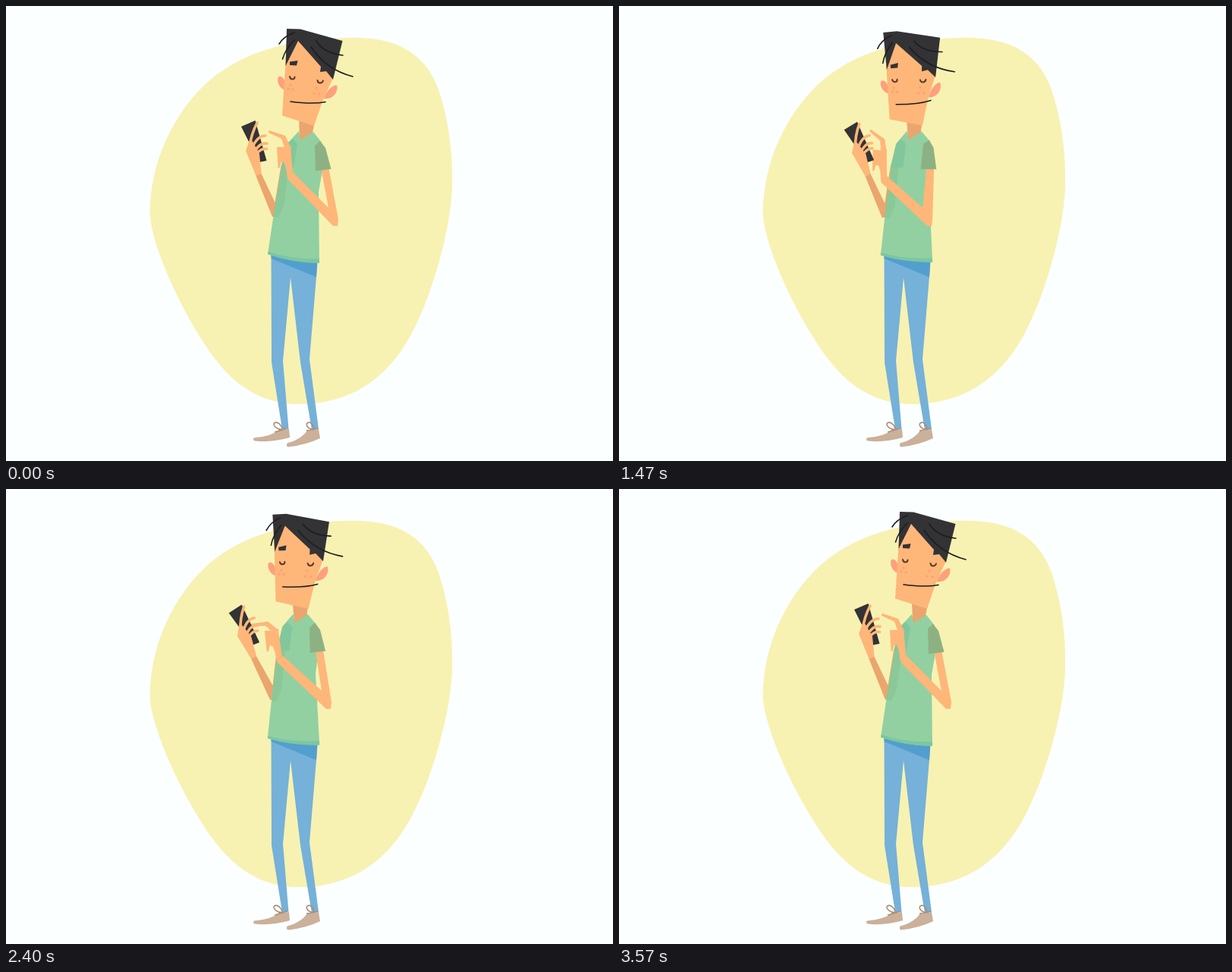
Animation of 800x600 px, one loop 3600 ms. Source, as an HTML page:

```html
<!DOCTYPE html>
<html lang="en">
<head>
<meta charset="utf-8">
<title>Man tapping on a phone</title>
<style>
  html, body { margin: 0; width: 100%; height: 100%; overflow: hidden; background: #fcffff; }
  svg { display: block; width: 800px; height: 600px; }
  .skin { fill: #ffb679; }
  .shade { fill: #eba56e; }
  .dark { fill: #333335; }
  .line { fill: none; stroke: #1d1d1f; stroke-width: 1.6; stroke-linecap: round; }
  .lace { fill: none; stroke: #a98d76; stroke-width: 1.6; }
  .fingers { fill: none; stroke: #ffb679; stroke-width: 3.6; stroke-linecap: round; }
</style>
</head>
<body>
<svg viewBox="0 0 800 600">
  <path fill="#f7f2b2" d="M447 42C505 40 550 55 570 110C585 155 589 200 588 235C588 290 560 390 530 440C495 500 445 525 386 525C325 525 287 487 258 440C223 385 193 315 189.5 275C190 198 226 137 266 100C316 56 385 43 447 42z"/>

  <g id="legs">
    <path fill="#75b1d8" d="M349.500 329L410 338 409 357 400 466 412 558 403 559 388 470 375 358 365 468 372.500 558 364 558 350 470z"/>
    <path fill="#529fcf" d="M349.500 328L410.500 337 409 357.500 349.500 333z"/>
    <g fill="#cbb09a">
      <path d="M326 571Q326 569 330 569Q350 567 360 559L373 558 374 569Q350 576 328 573.500Q326 573 326 571z"/>
      <path d="M370 578Q370 576 374 575.500Q389 571 397 560L412 558 414 570Q395 579 372 581.500Q369.500 581 370 578z"/>
    </g>
    <path class="lace" d="M366 558C358 560 351 553 353.500 550C358 547 363 553 364 557M354 562L370 557M408 558C400 560 394 553 397 550C402 547 405 553 406 557M396 560L411 557"/>
  </g>

  <polygon id="phoneArm" class="shade"/>

  <g id="torso">
    <path class="shade" d="M386 148L407 152 404 167 394 178 387 176z"/>
    <path fill="#92d0a1" d="M386 165L388 176.500 405 166 416 180 417 217 412 245 413 339Q375 338 345 327L352 280 363 222 372 180z"/>
    <path class="shade" d="M387 164L388.500 176.500 404.500 166z"/>
    <path fill="#7cc7a0" d="M345.500 324Q375 334 413 333.500V339Q375 338 345 327.500z"/>
    <path fill="#82c79c" d="M371 181L378 175 384 182 379 213 362 213z"/>
    <path fill="#8bc898" d="M363 213L373 213 371 228 366 264 359 279 352 278z"/>
    <g id="head">
      <path fill="#ffa07c" d="M368 111C357 108 356 92 361 92.500C365 93 367 98 368 101zM418 123C425 106 436 102 436.500 106C437 117 428 124 418 122z"/>
      <path class="skin" d="M369 66L364 144.500 406 158 418 123 431 95 416 58 385 42z"/>
      <path class="dark" d="M368.500 79L370 30 388 30.500 443.500 46 431 97 422 86 414 87 415 80 385 46zM374 73.500L384.500 72 383 78.500 374 78z"/>
      <path class="line" d="M360 50Q366 40 380 35M364.500 70Q368 57 380 45M409 46Q418 62 444 65M402 54Q422 84 457 93M375 126C390 128 408 129 421 126.500"/>
      <path class="line" style="stroke:#5b3c2c;stroke-width:2" d="M374 93q.5 3.500 3.500 3.500t3-3M410.500 98q.5 3.500 3.500 3.500t4-3"/>
      <path stroke="#ff9c74" stroke-width="3" stroke-linecap="round" d="M375 104h0M372 109h0M378 110h0M409 108h0M406 115h0M413 116h0"/>
    </g>
  </g>

  <polygon id="tapArm" class="skin"/>
  <g id="tapHand" class="skin">
    <path d="M357 186L368 186 375 184 378 219 371 228 369 214 366 206 362.500 206 361 213 358.500 214z"/>
    <path id="finger" d="M347 164Q345 166 347 167.500L363 175 368 189 376 188 368 171z"/>
  </g>
  <path id="sleeve" fill="#8db183" d="M407 184L414 178 421 187 428.500 215 408 217.500z"/>

  <g id="phoneHand">
    <path class="dark" d="M310 159L328.500 151 343.500 204 333.500 206z"/>
    <path class="skin" d="M329.500 224L316 191 322 174 327 182 334 195 336.500 221z"/>
    <path class="fingers" d="M321 186Q323 169 331 154M324 188Q331 171 342 171M328 191Q336 179 344 181.500M330 195Q337 187 343.500 188.500"/>
  </g>
</svg>
<script>
const LOOP = 3600;
const HIP = [379, 333], NECK = [397, 150], SHOULDER = [414, 182];
const WRIST = [332, 222], TAP_WRIST = [371, 228], KNUCKLE = [372, 187];
const part = id => document.getElementById(id);

function ease(u) {
  u = Math.max(0, Math.min(1, u));
  return u * u * (3 - 2 * u);
}

// Rises from 0 to 1 at the peak and falls back to 0.
function pulse(t, start, peak, end) {
  return t < peak ? ease((t - start) / (peak - start)) : ease((end - t) / (end - peak));
}

// Every joint is its rest position plus a share of a few overlapping gestures.
function poseAt(t) {
  const relax = pulse(t, 0, 540, 1110);
  const tap = pulse(t, 540, 820, 1110);
  const lift = pulse(t, 540, 1110, 1740);
  const sway = pulse(t, 1110, 1740, 2100);
  const press = pulse(t, 1740, 2100, 2670);
  const bob = pulse(t, 2100, 2380, 2670);
  const read = pulse(t, 2100, 2670, 3570);
  const hold = sway + press + read;
  const busy = relax + lift + press + read;
  return {
    lean: -0.7 * hold - 2.9 * sway - 1.3 * read - 1.2 * bob,
    head: -2.4 * relax + 3.7 * lift - 14.2 * sway + press - 2.9 * read - 4 * bob,
    phone: -7 * hold - 6 * sway - 2.5 * bob,
    wrist: shift(WRIST, -2.5 * hold - 5.5 * sway - 1.5 * read - 3 * bob, sway),
    elbow: [352 - 3 * hold - 4 * sway, 278 + 2 * sway],
    tapElbow: [437 - 9 * busy - 35 * sway, 290],
    tapWrist: shift(TAP_WRIST, -8 * busy - 37 * sway - 6 * bob,
      7 * lift + 3 * (sway + press) - 2 * read),
    tapHand: 8.5 * relax + 2 * lift + 6 * sway + 5 * press - 10 * read,
    finger: 8 * lift + 14 * sway - 42 * press - 7.5 * read - 38 * tap
  };
}

function turn([x, y], angle, [cx, cy]) {
  const a = angle * Math.PI / 180, c = Math.cos(a), s = Math.sin(a);
  return [cx + (x - cx) * c - (y - cy) * s, cy + (x - cx) * s + (y - cy) * c];
}

function shift([x, y], dx, dy) {
  return [x + dx, y + dy];
}

// Rotate a part about its pivot and carry that pivot to a new place.
function place(id, angle, pivot, to = pivot) {
  part(id).setAttribute('transform',
    `translate(${to}) rotate(${angle}) translate(${-pivot[0]} ${-pivot[1]})`);
}

function draw(t) {
  const { lean, head, phone, wrist, elbow, tapElbow, tapWrist, tapHand, finger } = poseAt(t);

  place('torso', lean, HIP);
  place('head', head - lean, NECK, shift(NECK, 0, -0.6 * lean));
  place('phoneHand', phone, WRIST, wrist);
  place('tapHand', tapHand, TAP_WRIST, tapWrist);
  place('finger', finger, KNUCKLE);

  const armpit = turn([365, 213], lean, HIP);
  part('phoneArm').setAttribute('points', [
    shift(wrist, -3, 1), shift(wrist, 4, -2), shift(elbow, 2.5, -19),
    shift(armpit, -3, 0), shift(armpit, 8, 0), shift(elbow, 6, -2), elbow, shift(elbow, -1, 0)
  ].join(' '));

  // The sleeve follows most of the upper arm's swing.
  const shoulder = turn(SHOULDER, lean, HIP);
  const drop = Math.atan2(tapElbow[0] - shoulder[0], tapElbow[1] - shoulder[1]) * 180 / Math.PI;
  const swing = (12 - drop) * 0.75;
  place('sleeve', swing, SHOULDER, shoulder);

  const onSleeve = (dx, dy) => turn(shift(shoulder, dx, dy), swing, shoulder);
  part('tapArm').setAttribute('points', [
    onSleeve(11, 30), shift(tapElbow, 1, -9), tapElbow, shift(tapElbow, -6, 0),
    tapWrist, shift(tapWrist, 7, -9), shift(tapElbow, -12, -24), onSleeve(1, 31)
  ].join(' '));
}

function frame(now) {
  draw(now % LOOP);
  requestAnimationFrame(frame);
}
requestAnimationFrame(frame);
</script>
</body>
</html>
```
